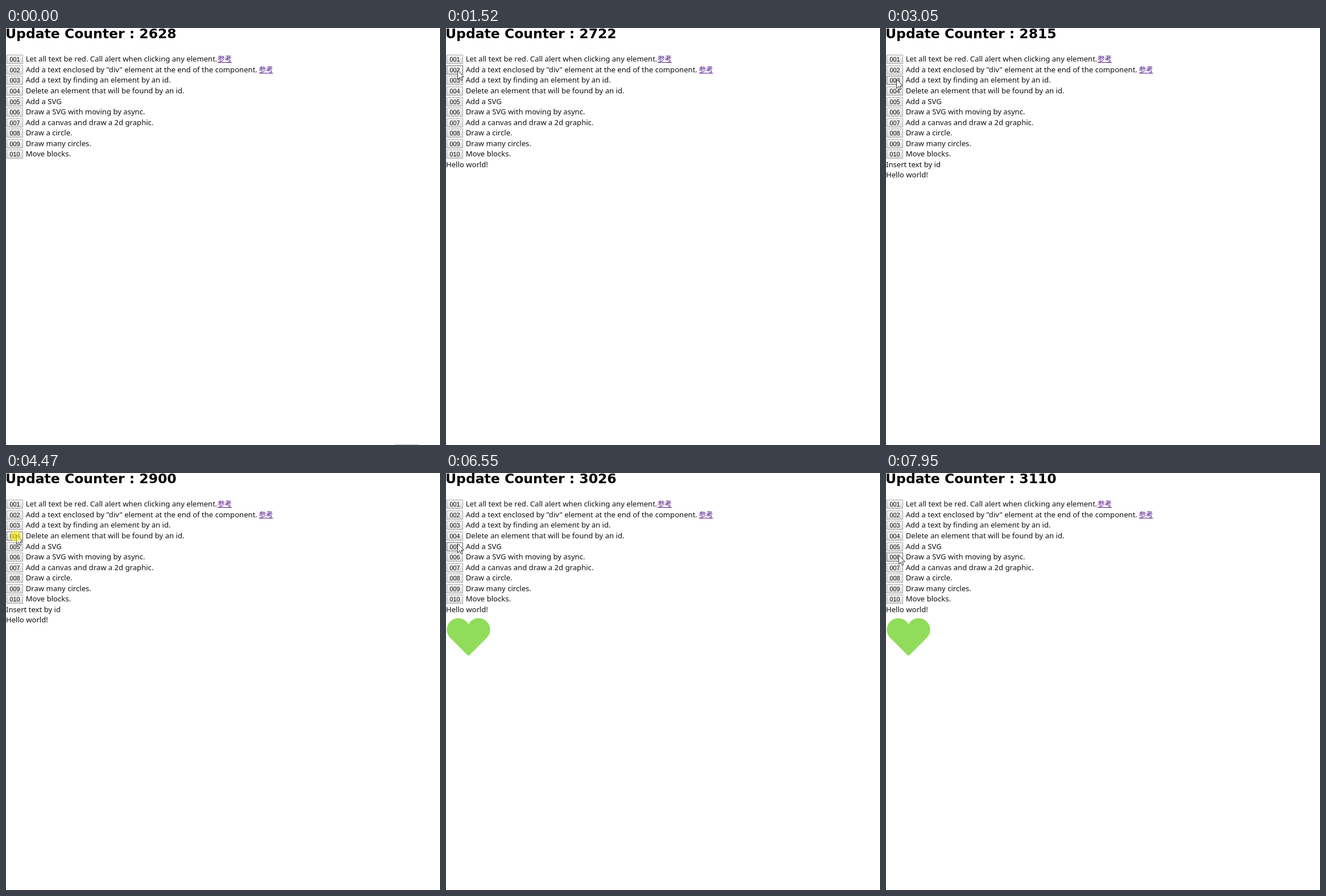
Animation of 763x734 px, one loop 8 s. Source, as an HTML page:

```html
<!DOCTYPE html>
<html lang="en">
<head>
<meta charset="utf-8">
<title>Update Counter</title>
<style>
  html, body { margin: 0; width: 100%; height: 100%; overflow: hidden; background: #fff; }
  svg { display: block; width: 763px; height: 734px; }
  text { font: 13.1px "Noto Sans", "Open Sans", sans-serif; fill: #111; white-space: pre; }
  .title { font: 700 23.5px "DejaVu Sans", Verdana, sans-serif; fill: #000; }
  .num { font: 10.8px "Liberation Sans", Arial, sans-serif; text-anchor: middle; }
  .link { font: 12.5px "Noto Sans CJK JP", "Noto Sans CJK", sans-serif; fill: #551a8b; }
  .btn { fill: url(#face); stroke: #aaa; }
  .btn.hover { stroke: #707070; }
</style>
</head>
<body>
<svg id="stage" viewBox="0 0 763 734">
  <defs>
    <linearGradient id="face" x2="0" y2="1">
      <stop offset="0" stop-color="#f6f6f6"/>
      <stop offset="1" stop-color="#dadada"/>
    </linearGradient>
  </defs>
  <text class="title" id="title" x="-1" y="18"></text>
  <g id="list"></g>
  <text id="insert" x="0">Insert text by id</text>
  <text id="hello" x="0">Hello world!</text>
  <path id="heart" fill="#91dc5a" d="M39.5 266.2A20.3 20.3 0 1 0 6.95 289.85L37.4 320.3Q39.5 322.6 41.6 320.3L72.05 289.85A20.3 20.3 0 1 0 39.5 266.2Z"/>
  <path id="focus" d="M683 733.5H727" stroke="#777" stroke-dasharray="1 1"/>
  <path id="cursor" d="M.5.5V16.5L4.2 12.9L6.7 18.5L9 17.5L6.6 12H11.5Z" fill="#fff" stroke="#222" stroke-width=".9"/>
  <circle id="press" r="9.5" fill="#fe0" fill-opacity=".6"/>
</svg>
<script>
const LOOP = 8000;
const $ = id => document.getElementById(id);
const rowY = i => Math.round(54.35 + 18.55 * i);

const items = [
  "Let all text be red. Call alert when clicking any element.",
  'Add a text enclosed by "div" element at the end of the component.',
  "Add a text by finding an element by an id.",
  "Delete an element that will be found by an id.",
  "Add a SVG",
  "Draw a SVG with moving by async.",
  "Add a canvas and draw a 2d graphic.",
  "Draw a circle.",
  "Draw many circles.",
  "Move blocks."
];
const linkX = [372, 444.5];

// time, counter value, screen updates until the next entry
const ticks = [
  [0, 2628, 20], [1520, 2722, 20], [3050, 2815, 18], [4470, 2900, 11],
  [5300, 2951, 16], [6550, 3026, 18], [7950, 3110, 1]
];

// time, x, y of the pointer tip
const moves = [
  [230, 634, 687], [1000, 20, 74], [2000, 20, 74], [2400, 18, 90],
  [3600, 18, 90], [4220, 18, 103], [4400, 18, 109], [5350, 18, 109],
  [5800, 20, 124], [7050, 20, 124], [7600, 22, 141], [7800, 22, 144]
];

// press and release times
const clicks = [[1180, 1330], [2760, 2910], [4400, 4560], [6180, 6340]];
const [added, inserted, deleted, drawn] = clicks.map(c => c[1]);

function add(parent, tag, attrs, text = "") {
  const el = document.createElementNS("http://www.w3.org/2000/svg", tag);
  for (const k in attrs) el.setAttribute(k, attrs[k]);
  el.textContent = text;
  return parent.appendChild(el);
}

const buttons = items.map((label, i) => {
  const y = rowY(i), list = $("list");
  const btn = add(list, "rect", { class: "btn", x: 1.5, y: y - 6.5, width: 28, height: 15 });
  add(list, "text", { class: "num", x: 15.5, y: y + 5 }, String(i + 1).padStart(3, "0"));
  add(list, "text", { x: 34.7, y: y + 5 }, label);
  if (i < linkX.length) {
    add(list, "text", { class: "link", x: linkX[i], y: y + 5 }, "参考");
    add(list, "path", { d: `M${linkX[i]} ${y + 6.5}h25`, stroke: "#551a8b" });
  }
  return btn;
});

const show = (id, on) => $(id).setAttribute("visibility", on ? "visible" : "hidden");
const place = (id, x, y) => $(id).setAttribute("transform", `translate(${x} ${y})`);

function sample(t) {
  const i = ticks.findLastIndex(k => k[0] <= t);
  const [t0, n0, steps] = ticks[i];
  if (i === ticks.length - 1) return { time: t0, count: n0 };
  const [t1, n1] = ticks[i + 1];
  const p = Math.floor((t - t0) / (t1 - t0) * steps + 1e-6) / steps;
  return { time: t0 + p * (t1 - t0), count: Math.round(n0 + p * (n1 - n0)) };
}

function pointer(t) {
  const i = moves.findIndex(m => m[0] > t);
  if (i < 1) return moves[i < 0 ? moves.length - 1 : 0].slice(1);
  const a = moves[i - 1], b = moves[i];
  const p = (t - a[0]) / (b[0] - a[0]), e = p * p * (3 - 2 * p);
  return [1, 2].map(k => Math.round(a[k] + (b[k] - a[k]) * e));
}

function render(t) {
  const { time, count } = sample(t);
  const [x, y] = pointer(time);
  const visible = time >= moves[0][0];
  const hasInsert = time >= inserted && time < deleted;

  $("title").textContent = `Update Counter : ${count}`;
  place("cursor", x, y);
  show("cursor", visible);
  place("press", x - 1, y + 2);
  show("press", clicks.some(([a, b]) => time >= a && time < b));
  buttons.forEach((b, i) => {
    const over = visible && x < 30 && Math.abs(y - rowY(i) - 1) <= 8;
    b.classList.toggle("hover", over);
  });

  $("insert").setAttribute("y", rowY(10) + 5);
  show("insert", hasInsert);
  $("hello").setAttribute("y", rowY(hasInsert ? 11 : 10) + 5);
  show("hello", time >= added);
  show("heart", time >= drawn);
  show("focus", time < clicks[0][0]);
}

const start = performance.now();
function loop() {
  render((performance.now() - start) % LOOP);
  requestAnimationFrame(loop);
}
loop();
</script>
</body>
</html>
```
